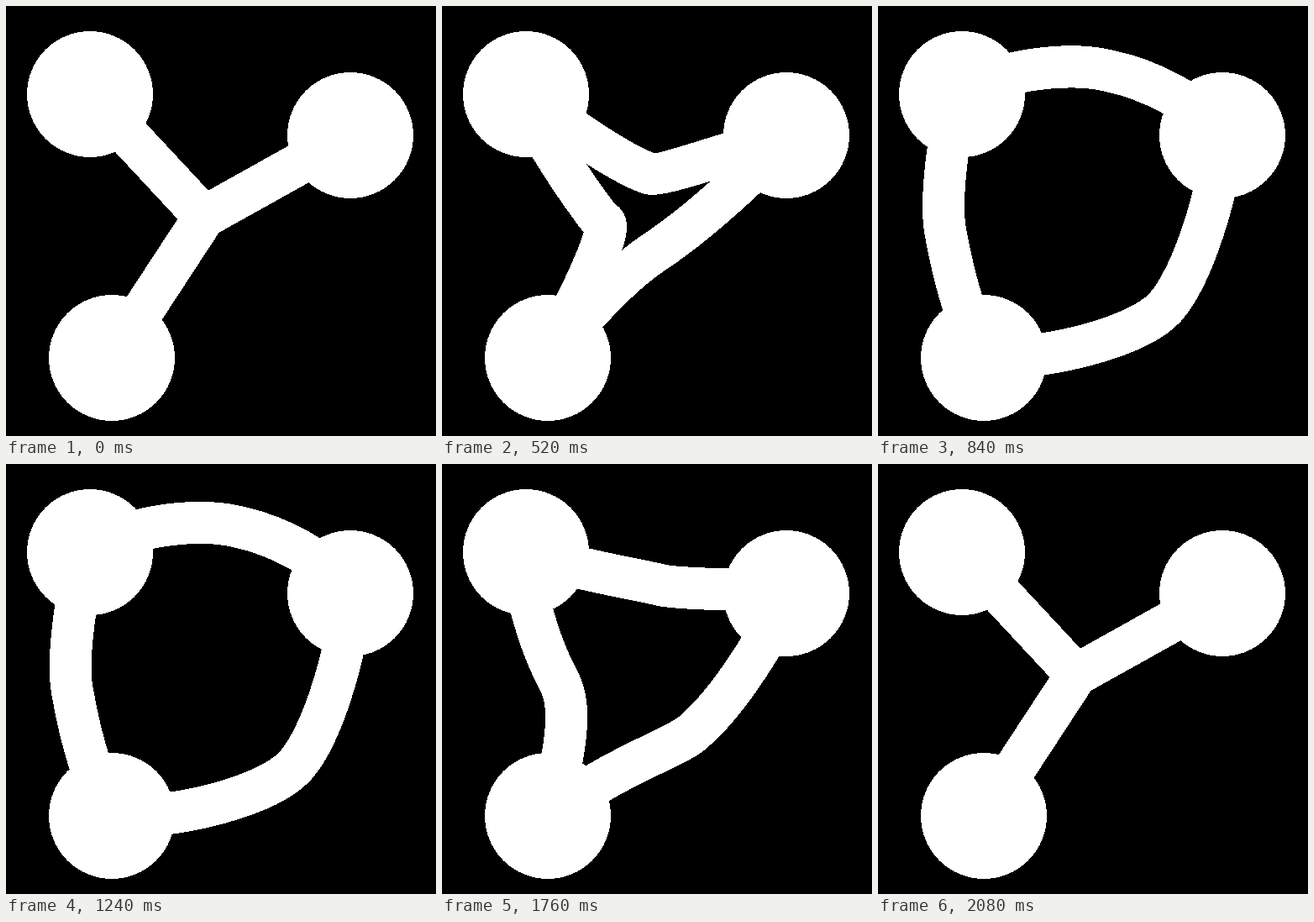
An HTML page for the animation above (2440 ms loop, 512 by 512 pixels).

```html
<!DOCTYPE html>
<html lang="en">
<head>
<meta charset="utf-8">
<title>Linked nodes</title>
<style>
  html, body { margin: 0; width: 100%; height: 100%; overflow: hidden; background: #000; }
  svg { display: block; width: 100vw; height: 100vh; shape-rendering: crispEdges; }
  path { fill: none; stroke: #fff; stroke-width: 50; stroke-linejoin: round; }
  circle { fill: #fff; }
</style>
</head>
<body>
<svg viewBox="0 0 512 512">
  <path/><path/><path/>
  <circle cx="100" cy="105" r="75"/>
  <circle cx="410" cy="154" r="75"/>
  <circle cx="126" cy="419" r="75"/>
</svg>
<script>
const LOOP = 2440, STEP = 40;
const paths = document.querySelectorAll('path');
const hub = [236, 251];
const a = [100, 105], b = [410, 154], c = [126, 419];

// mid: joint of the open link, before and after its slow drift
// reach: closed handles (first node, joint, second node) as a share of the arm
// start, into, out, end: handles of the open link
const links = [
  { from: a, to: b, mid: [[277, 75], [277, 75]], reach: [.75, 0, .5],
    start: [45, -33], into: [-46, -12], out: [46, 10], end: [-32, -42] },
  { from: a, to: c, mid: [[78, 269], [79, 268]], reach: [0, .4, 1.35],
    start: [-17, 40], into: [-6, -36], out: [2, 10], end: [-34, -62] },
  { from: b, to: c, mid: [[343, 361], [345, 359]], reach: [.2, .26, 1.05],
    start: [-1, 61], into: [34, -38], out: [-34, 36], end: [74, 5] }
];

const mix = (p, q, k) => p.map((v, i) => v + (q[i] - v) * k);
const add = (p, v) => p.map((n, i) => n + v[i]);
const sub = (p, q) => p.map((n, i) => n - q[i]);

function ease(t, from, to) {
  const s = Math.min(1, Math.max(0, (t - from) / (to - from)));
  return s * s * (3 - 2 * s);
}

function linkPath({ from, to, mid, reach, start, into, out, end }, open, drift) {
  const joint = mix(hub, mix(...mid, drift), open);
  // A handle turns from a share of its arm into its open direction
  const handle = (base, arm, share, dir) =>
    add(base, mix(arm.map(v => v * share), dir, open));
  return `M${from} C${handle(from, sub(hub, from), reach[0], start)}
    ${handle(joint, sub(from, hub), reach[1], into)} ${joint}
    C${handle(joint, [0, 0], 0, out)}
    ${handle(to, sub(hub, to), reach[2], end)} ${to}`;
}

function draw() {
  const t = Math.floor(performance.now() % LOOP / STEP) * STEP;
  const open = ease(t, 320, 880) - ease(t, 1520, 2080);
  const drift = ease(t, 880, 1520);
  links.forEach((link, i) => paths[i].setAttribute('d', linkPath(link, open, drift)));
  requestAnimationFrame(draw);
}
draw();
</script>
</body>
</html>
```
